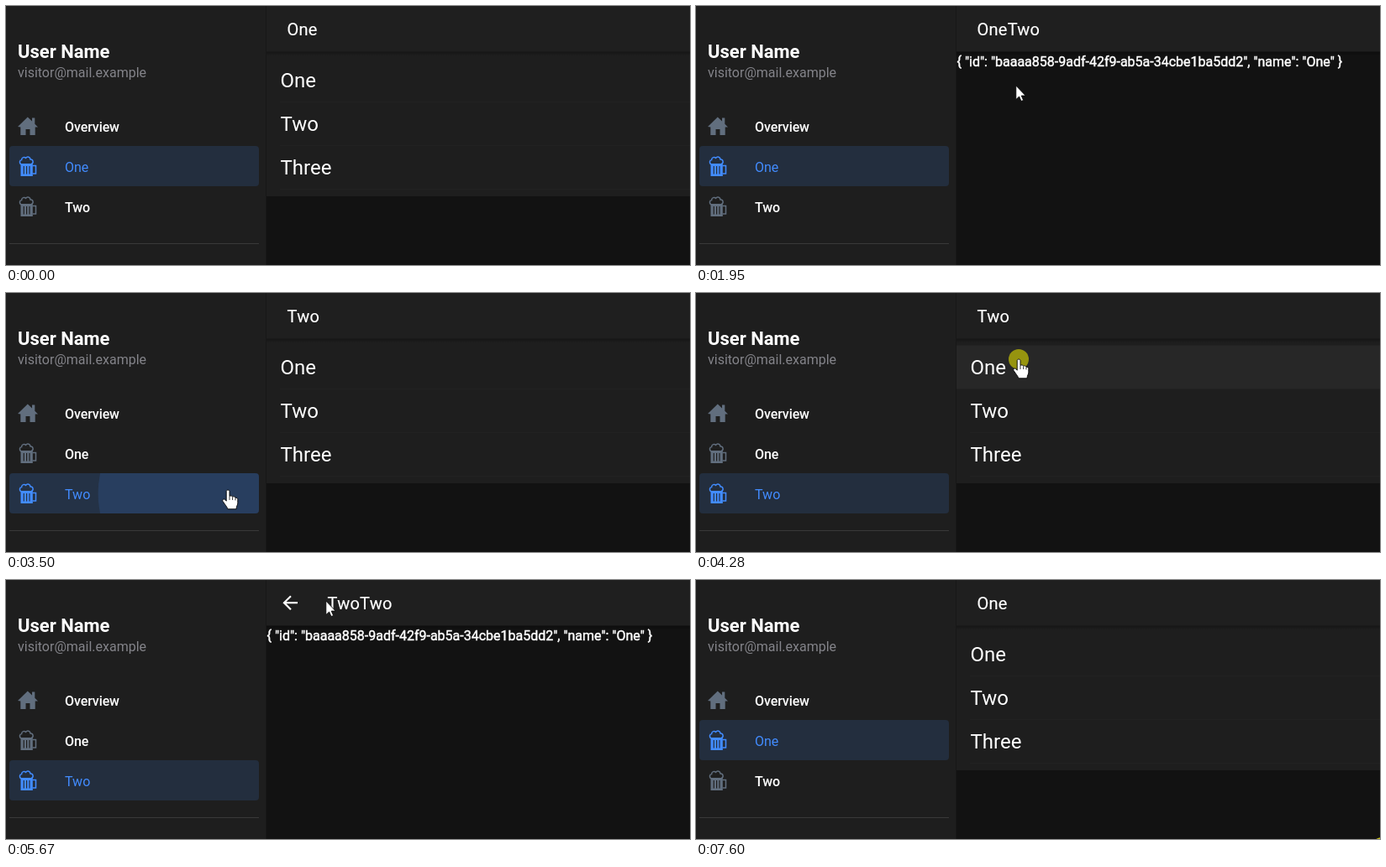
An HTML page that plays this animation: 814 by 309 pixels, repeating every 7670 ms.

```html
<!DOCTYPE html>
<html lang="en">
<head>
<meta charset="utf-8">
<title>Menu navigation</title>
<style>
html, body { margin: 0; width: 100%; height: 100%; overflow: hidden; background: #121212; }
svg { display: block; width: 814px; height: 309px; }
text { font-family: Roboto, sans-serif; font-size: 16px; fill: #fff; white-space: pre; }
.title { font-size: 20px; letter-spacing: .25px; stroke: #fff; stroke-width: .2px; }
.entry { font-size: 24px; }
.json { stroke: #fff; stroke-width: .45px; }
.menu text { font-weight: 500; letter-spacing: -.1px; }
.menu { color: #616e7e; }
.menu.on { color: #428cff; }
.menu.on text { fill: #428cff; font-weight: 400; letter-spacing: 0; }
.tint { fill: #428cff; opacity: 0; }
.on .tint { opacity: .14; }
.hover { fill: #fff; opacity: 0; }
.on .hover { fill: #428cff; }
</style>
</head>
<body>
<svg viewBox="0 0 814 309">
  <defs>
    <linearGradient id="shade" x2="0" y2="1">
      <stop stop-color="#000" stop-opacity=".28"/>
      <stop offset="1" stop-color="#000" stop-opacity="0"/>
    </linearGradient>
    <clipPath id="content"><rect x="310" width="504" height="309"/></clipPath>
    <clipPath id="rowClip"><rect id="rowBox"/></clipPath>
    <g id="bar">
      <rect x="310" width="504" height="54.5" fill="#1f1f1f"/>
      <rect x="310" y="54.5" width="504" height="5" fill="url(#shade)"/>
    </g>
    <path id="home" fill="currentColor" d="M14 144 25.8 132.5 31 137.5V133.5H34.3V140.8L38 144.5H34.7V154H28.5V147H23.5V154H17.3V144.5Z"/>
    <g id="beer" fill="none" stroke="currentColor" stroke-width="1.5">
      <path d="M17.5 188H31.8V203H17.5ZM20.6 191V200.5H21.8V191ZM24 191V200.5H25.2V191ZM27.4 191V200.5H28.6V191Z" fill="currentColor" fill-rule="evenodd" stroke="none"/>
      <path d="M31.5 190.5H35.5V200H31.5"/>
      <path d="M18 189C15.5 187.5 16 184 18.6 183.6C18.5 180.5 22 179.5 23.5 181.4C25.5 179 29 180.3 29 183C32.3 182.6 33.3 187.5 30.3 188.3"/>
    </g>
    <path id="arrow" d="M.8-1V15.5L4.6 12 7 17.5 9.6 16.4 7.2 11H12.2Z" fill="#fff" stroke="#000" stroke-width=".8"/>
    <g id="hand">
      <path d="M-1.8 1.6C-1.8-.4 2-.4 2 1.6V7.4C3 6.4 5.4 6.8 5.6 8.2C6.8 7.4 8.8 8 9 9.4C10.2 8.8 11.8 9.6 11.8 11.2V15.5C11.8 18 10 19.5 10 22.8H-.2C-.8 20-3.4 17.6-6 13.4C-7 11.6-4.6 10.2-3.2 11.6L-1.8 13.2Z" fill="#fff" stroke="#000" stroke-width=".9"/>
      <path d="M2 7.5V12M5.6 8.5V12M9 9.6V12.4" stroke="#000" stroke-width=".8"/>
    </g>
    <path id="beam" d="M-3-7.5H-.5L.5-6.5 1.5-7.5H4M.5-6.5V6.5M-3 7.5H-.5L.5 6.5 1.5 7.5H4" fill="none" stroke="#ccc"/>
  </defs>

  <rect width="814" height="309" fill="#121212"/>
  <rect x="310" y="54" width="504" height="173" fill="#1e1e1e"/>
  <g id="entries"></g>
  <use href="#bar"/>
  <text id="listTitle" class="title" x="334.5" y="35"></text>

  <rect width="309.5" height="309" fill="#1e1e1e"/>
  <text x="14" y="62" style="font-size:22px;font-weight:700">User Name</text>
  <text x="14" y="85" style="fill:#84848a">visitor@mail.example</text>
  <g id="menu"></g>
  <path d="M4 283.5H301" stroke="#393939"/>
  <g clip-path="url(#rowClip)"><circle id="ripple"/></g>

  <g clip-path="url(#content)">
    <g id="detailPage">
      <rect x="310" width="504" height="309" fill="#121212"/>
      <use href="#bar"/>
      <path id="back" fill="#fff" transform="translate(325 14) scale(1.1)" d="M20 11H7.8L13.4 5.4 12 4 4 12 12 20 13.4 18.6 7.8 13H20Z"/>
      <text id="detailTitle" class="title" y="35"></text>
      <text class="json" x="310.5" y="72">{ "id": "baaaa858-9adf-42f9-ab5a-34cbe1ba5dd2", "name": "One" }</text>
    </g>
  </g>

  <circle id="halo" r="12" fill="#96940f"/>
  <use id="cursor"/>
  <circle id="corner" cx="816" cy="319" r="12" fill="#c9c01a"/>
</svg>
<script>
const LOOP = 7670, STEP = 77.5;
const $ = id => document.getElementById(id);
const set = (el, attrs) => { for (const k in attrs) el.setAttribute(k, attrs[k]); };
const show = (el, on) => set(el, { visibility: on ? 'visible' : 'hidden' });

const menuRow = i => ({ x: 4, y: 119 + i * 48, width: 297, height: 48, rx: 4 });
const entryRow = i => ({ x: 310, y: 62.5 + i * 52, width: 504, height: 52, rx: 0 });
const rect = (cls, box) =>
  `<rect class="${cls}" ${Object.entries(box).map(([k, v]) => `${k}="${v}"`).join(' ')}/>`;

$('entries').innerHTML = ['One', 'Two', 'Three'].map((name, i) => `
  ${rect('hover', entryRow(i))}
  <path d="M326 ${114.5 + i * 52}H814" stroke="#222"/>
  <text class="entry" x="326.5" y="${97 + i * 52}">${name}</text>`).join('');

$('menu').innerHTML = ['Overview', 'One', 'Two'].map((name, i) => `
  <g class="menu">
    ${rect('tint', menuRow(i))}
    ${rect('hover', menuRow(i))}
    <use href="#${i ? 'beer' : 'home'}" y="${i ? (i - 1) * 48 : 0}"/>
    <text x="70" y="${150 + i * 48}">${name}</text>
  </g>`).join('');

const menuRows = [...document.querySelectorAll('.menu')];
const menuHovers = [...document.querySelectorAll('.menu .hover')];
const entryHovers = [...document.querySelectorAll('#entries .hover')];

// Pointer path: step, x, y, shape used until the next row
const path = [
  [1, 689, 298, 'arrow'], [2, 642, 253, 'arrow'], [4, 540, 190, 'hand'], [6, 450, 142, 'hand'],
  [8, 400, 112, 'hand'], [10, 382, 101, 'hand'], [14, 382, 101, 'beam'], [17, 380, 100, 'arrow'],
  [24, 380, 100, 'arrow'], [25, 380, 96, 'arrow'], [27, 345, 60, 'arrow'], [29, 325, 40, 'arrow'],
  [35, 325, 40, 'arrow'], [37, 312, 75, 'arrow'], [40, 278, 175, 'hand'], [43, 264, 235, 'hand'],
  [45, 264, 235, 'hand'], [47, 285, 195, 'hand'], [49, 335, 110, 'hand'], [51, 378, 47, 'arrow'],
  [53, 384, 68, 'hand'], [55, 384, 79, 'hand'], [61, 384, 79, 'arrow'], [67, 384, 53, 'arrow'],
  [69, 348, 32, 'hand'], [71, 319, 18, 'hand'], [72, 345, 13, 'hand'], [73, 380, 26, 'arrow'],
  [74, 380, 26, 'arrow'], [76, 338, 92, 'arrow'], [79, 270, 200, 'hand'], [85, 270, 200, 'hand'],
  [87, 302, 166, 'hand'], [89, 577, 220, 'arrow'], [90, 840, 300, 'arrow']
];
const presses = [[10, 12], [43, 45], [55, 57], [82, 84]];
const ripples = [
  { at: 930, x: 382, y: 101, box: entryRow(0), fill: '#fff' },
  { at: 3420, x: 264, y: 239, box: menuRow(2), fill: '#428cff' },
  { at: 4417, x: 384, y: 79, box: entryRow(0), fill: '#fff' },
  { at: 6432, x: 270, y: 200, box: menuRow(1), fill: '#428cff' }
];
const details = [
  { at: 1018, until: 45, title: 'OneTwo', back: false },
  { at: 4505, until: 84, title: 'TwoTwo', back: true }
];

const clamp = v => Math.min(1, Math.max(0, v));
const within = (v, a, b) => v >= a && v < b;
const mix = (a, b, k) => a + (b - a) * k;

function bezier(x1, y1, x2, y2) {
  const curve = (a, b, s) => 3 * (1 - s) ** 2 * s * a + 3 * (1 - s) * s * s * b + s ** 3;
  return x => {
    let lo = 0, hi = 1;
    for (let i = 0; i < 24; i++) {
      const mid = (lo + hi) / 2;
      if (curve(x1, x2, mid) < x) lo = mid; else hi = mid;
    }
    return curve(y1, y2, lo);
  };
}
const easePage = bezier(.36, .66, .04, 1);
const easeRipple = bezier(.4, 0, .2, 1);

function pointerAt(step) {
  const i = path.findIndex((p, n) => step >= p[0] && n + 1 < path.length && step < path[n + 1][0]);
  if (i < 0) return null;
  const [s0, x0, y0, shape] = path[i], [s1, x1, y1] = path[i + 1];
  const k = (step - s0) / (s1 - s0);
  return { x: mix(x0, x1, k), y: mix(y0, y1, k), shape };
}

function drawPointer(step, listActive) {
  const p = pointerAt(step);
  show($('cursor'), p);
  if (p) set($('cursor'), { href: '#' + p.shape, transform: `translate(${p.x} ${p.y})` });
  const pressed = p && presses.some(([a, b]) => within(step, a, b));
  show($('halo'), pressed);
  if (pressed) set($('halo'), { cx: p.x, cy: p.y });
  const hover = (rows, boxOf, on) => rows.forEach((row, i) => {
    const b = boxOf(i);
    const hit = on && within(p.x, b.x, b.x + b.width) && within(p.y, b.y, b.y + b.height);
    row.style.opacity = hit ? .04 : 0;
  });
  hover(menuHovers, menuRow, p);
  hover(entryHovers, entryRow, p && listActive);
}

function drawRipple(time) {
  const r = ripples.find(r => within(time, r.at, r.at + 400));
  show($('ripple'), r);
  if (!r) return;
  const { x, y, width, height } = r.box;
  const age = time - r.at, k = easeRipple(clamp(age / 225));
  set($('rowBox'), r.box);
  set($('ripple'), {
    cx: mix(r.x, x + width / 2, k),
    cy: mix(r.y, y + height / 2, k),
    r: mix(width * .3, Math.hypot(width, height) / 2 + 5, k),
    fill: r.fill,
    opacity: .15 * clamp(age / 75) * (1 - clamp((age - 235) / 150))
  });
}

function draw(t) {
  const step = Math.floor((t + 8) / STEP), time = step * STEP;
  const page = within(step, 45, 84) ? 2 : 1;
  menuRows.forEach((row, i) => row.classList.toggle('on', i === page));
  $('listTitle').textContent = page === 2 ? 'Two' : 'One';

  const d = details.find(d => time >= d.at && step < d.until);
  show($('detailPage'), d);
  show($('back'), d && d.back);
  const k = d ? easePage(clamp((time - d.at) / 280)) : 0;
  if (d) {
    $('detailTitle').textContent = d.title;
    set($('detailTitle'), { x: d.back ? 382.5 : 334.5 });
    set($('detailPage'), { opacity: k > .998 ? 1 : k, transform: `translate(0 ${40 * (1 - k)})` });
  }
  drawPointer(step, k < .99);
  drawRipple(time);
  show($('corner'), step >= 98);
}

const start = performance.now();
function tick() {
  draw((performance.now() - start) % LOOP);
  requestAnimationFrame(tick);
}
tick();
</script>
</body>
</html>
```
